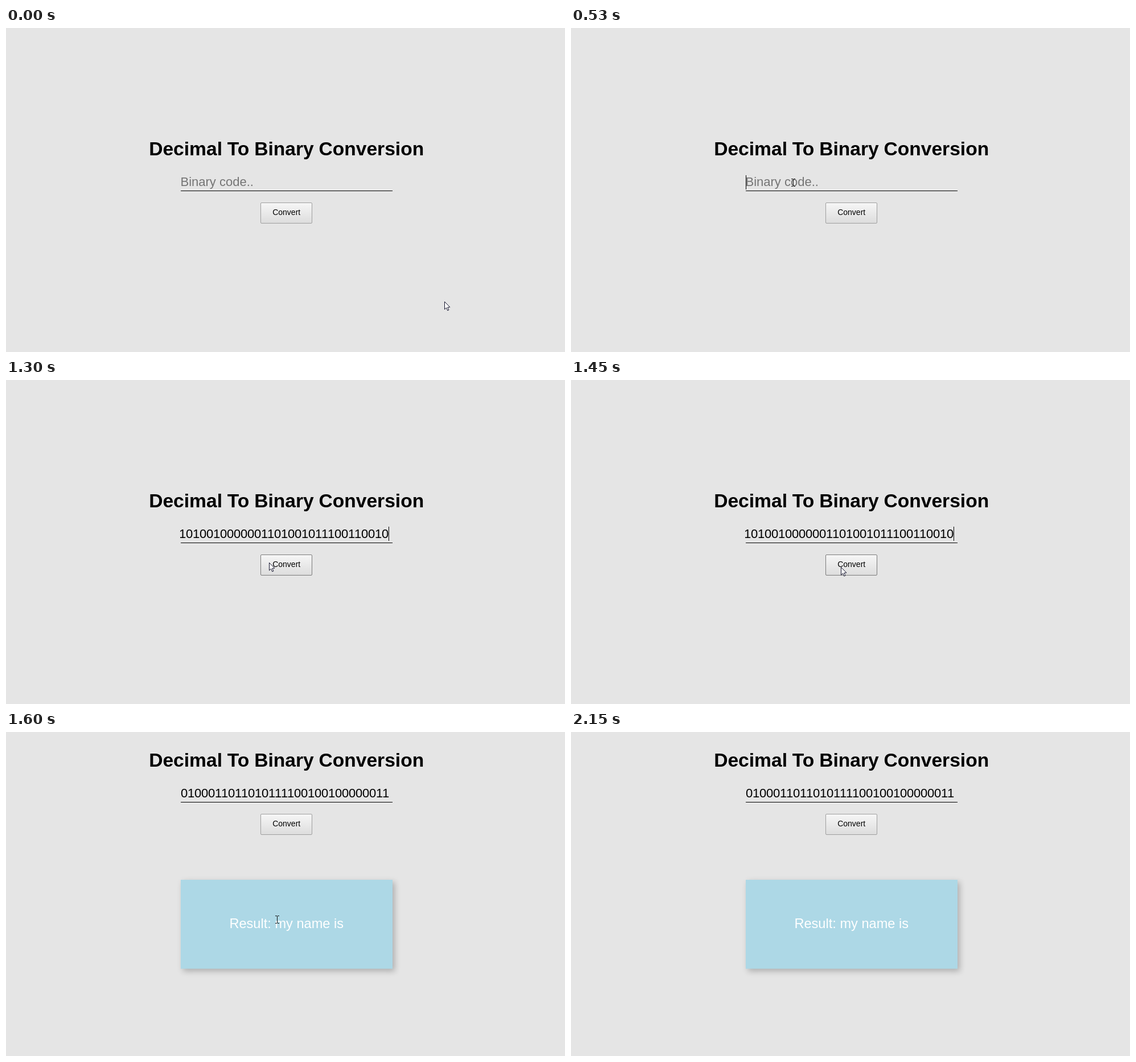
Recreate the animation shown at these times as an HTML page with a canvas. Size 982 px wide and 570 px high, loop 3390 ms.

```html
<!DOCTYPE html>
<html lang="en">
<head>
<meta charset="utf-8">
<title>Decimal To Binary Conversion</title>
<style>
  html, body { margin: 0; width: 100%; height: 100%; overflow: hidden; background: #e5e5e5; }
  canvas { display: block; }
</style>
</head>
<body>
<canvas id="stage" width="982" height="570"></canvas>
<script>
const ctx = document.getElementById('stage').getContext('2d');
const LOOP = 3390;
const FONT = '"Liberation Sans", Arial, sans-serif';
const MID = 492.7;
const FIELD = { x: 307, w: 372, base: 278 };
const PASTED = '1010010000001101001011100110010';
const PASTED_HEAD = '0100011011010111100100100000011';
const LIFT = 163;

// Key moments in ms
const MOVE = 70, FOCUS = 530, PASTE = 990, PRESS = 1530, RESULT = 1600, LEAVE = 1780, GONE = 2150;

const mix = (a, b, p) => a + (b - a) * p;
const between = (a, b, p) => ({ x: mix(a.x, b.x, p), y: mix(a.y, b.y, p) });
const easeInOut = p => (1 - Math.cos(Math.PI * p)) / 2;
const ticks = (t, start, gap) => Math.floor((t - start) / gap);

const REST = { x: 770, y: 481 };
const INPUT = { x: 390, y: 272 };
const HOVER = { x: 462, y: 321 };
const CLICK = { x: 474, y: 329 };
const READ = { x: 476, y: 330 };
const EXIT = { x: 818, y: 538 };

function pointer(t) {
  if (t < MOVE) return REST;
  if (t < FOCUS) return between(REST, INPUT, easeInOut((ticks(t, MOVE, 76.6) + 1) / 7));
  if (t < PASTE) return INPUT;
  if (t < PRESS) {
    const n = ticks(t, PASTE, 76.6);
    return n <= 4
      ? between(INPUT, HOVER, easeInOut(n / 4))
      : between(HOVER, CLICK, Math.min(1, (n - 4) / 2));
  }
  if (t < RESULT) return CLICK;
  if (t < LEAVE) return READ;
  if (t < GONE) return between(READ, EXIT, Math.pow(Math.min(1, (ticks(t, LEAVE, 74) + 1) / 5), 1.5));
  return null;
}

function text(str, x, y, font, color, align = 'left') {
  ctx.font = font + ' ' + FONT;
  ctx.fillStyle = color;
  ctx.textAlign = align;
  ctx.fillText(str, x, y);
}

// Digits sit on whole pixels; a pair of ones is one pixel tighter
function digits(str, x, y) {
  for (let i = 0; i < str.length; i++) {
    text(str[i], x, y, '22px', '#000');
    x += str[i] === '1' && str[i + 1] === '1' ? 11 : 12;
  }
}

function rect(x, y, w, h, color) {
  ctx.fillStyle = color;
  ctx.fillRect(x, y, w, h);
}

function title() {
  ctx.wordSpacing = '-0.5px';
  text('Decimal To Binary Conversion', MID, 224, 'bold 33.6px', '#000', 'center');
  ctx.wordSpacing = '0px';
}

function field(t) {
  ctx.save();
  ctx.beginPath();
  ctx.rect(FIELD.x - 1, 250, FIELD.w + 1, 36);
  ctx.clip();
  if (t < PASTE) {
    text('Binary code..', FIELD.x - 0.5, FIELD.base, '22px', '#757575');
    if (t >= FOCUS) rect(FIELD.x, 259, 1, 25, '#000');
  } else if (t < PRESS) {
    digits(PASTED, 304, FIELD.base);
    rect(672, 258, 1, 25, '#000');
  } else {
    digits(PASTED_HEAD, FIELD.x, FIELD.base);
  }
  ctx.restore();
  rect(FIELD.x, 286, FIELD.w, 1, '#000');
}

function button(hover, pressed) {
  const fill = ctx.createLinearGradient(0, 308, 0, 343);
  const shades = pressed ? ['#dcdcdc', '#f4f4f4'] : ['#f6f6f6', '#dddddd'];
  shades.forEach((c, i) => fill.addColorStop(i, c));
  ctx.beginPath();
  ctx.roundRect(447.5, 307.5, 90, 36, 1.5);
  ctx.fillStyle = fill;
  ctx.fill();
  ctx.strokeStyle = hover && !pressed ? '#7b7b7b' : '#9f9f9f';
  ctx.lineWidth = 1;
  ctx.stroke();
  text('Convert', MID, 329, '14px', '#000', 'center');
}

function card() {
  ctx.save();
  ctx.shadowColor = 'rgba(0,0,0,0.24)';
  ctx.shadowOffsetX = ctx.shadowOffsetY = 4;
  ctx.shadowBlur = 10;
  rect(307, 260, 372, 156.5, '#add8e6');
  ctx.restore();
  text('Result: my name is', MID, 345, '23.6px', '#fff', 'center');
}

function arrow({ x, y }) {
  const pts = [[0, 0], [0, 13.5], [3.1, 10.6], [5.2, 15.5], [7.4, 14.6], [5.3, 9.8], [9.4, 9.6]];
  ctx.save();
  ctx.translate(Math.round(x) + 0.5, Math.round(y) + 0.5);
  ctx.beginPath();
  pts.forEach(p => ctx.lineTo(...p));
  ctx.closePath();
  ctx.fillStyle = '#fff';
  ctx.fill();
  ctx.strokeStyle = '#15152e';
  ctx.lineWidth = 1;
  ctx.stroke();
  ctx.restore();
}

function beam({ x, y }) {
  x = Math.round(x);
  y = Math.round(y);
  rect(x, y - 6, 1, 12, '#111');
  for (const edge of [y - 7, y + 6]) {
    rect(x - 3, edge, 3, 1, '#111');
    rect(x + 1, edge, 3, 1, '#111');
  }
}

const inside = (p, x0, y0, x1, y1) => p && p.x >= x0 && p.x < x1 && p.y >= y0 && p.y < y1;

function draw(t) {
  const shown = t >= RESULT;
  const pressed = t >= PRESS && !shown;
  const p = pointer(t);

  rect(0, 0, 982, 570, '#e5e5e5');
  ctx.save();
  if (shown) ctx.translate(0, -LIFT);
  title();
  field(t);
  button(!shown && inside(p, 447, 307, 538, 344), pressed);
  ctx.restore();
  if (shown) card();

  if (pressed) {
    ctx.beginPath();
    ctx.arc(p.x + 0.5, p.y - 0.5, 13, 0, Math.PI * 2);
    ctx.fillStyle = 'rgba(255,246,40,0.65)';
    ctx.fill();
  }
  if (!p) return;
  const overText = shown ? inside(p, 393, 322, 593, 352) : inside(p, 307, 257, 679, 288);
  (overText ? beam : arrow)(p);
}

function frame() {
  draw(performance.now() % LOOP);
  requestAnimationFrame(frame);
}
frame();
</script>
</body>
</html>
```
